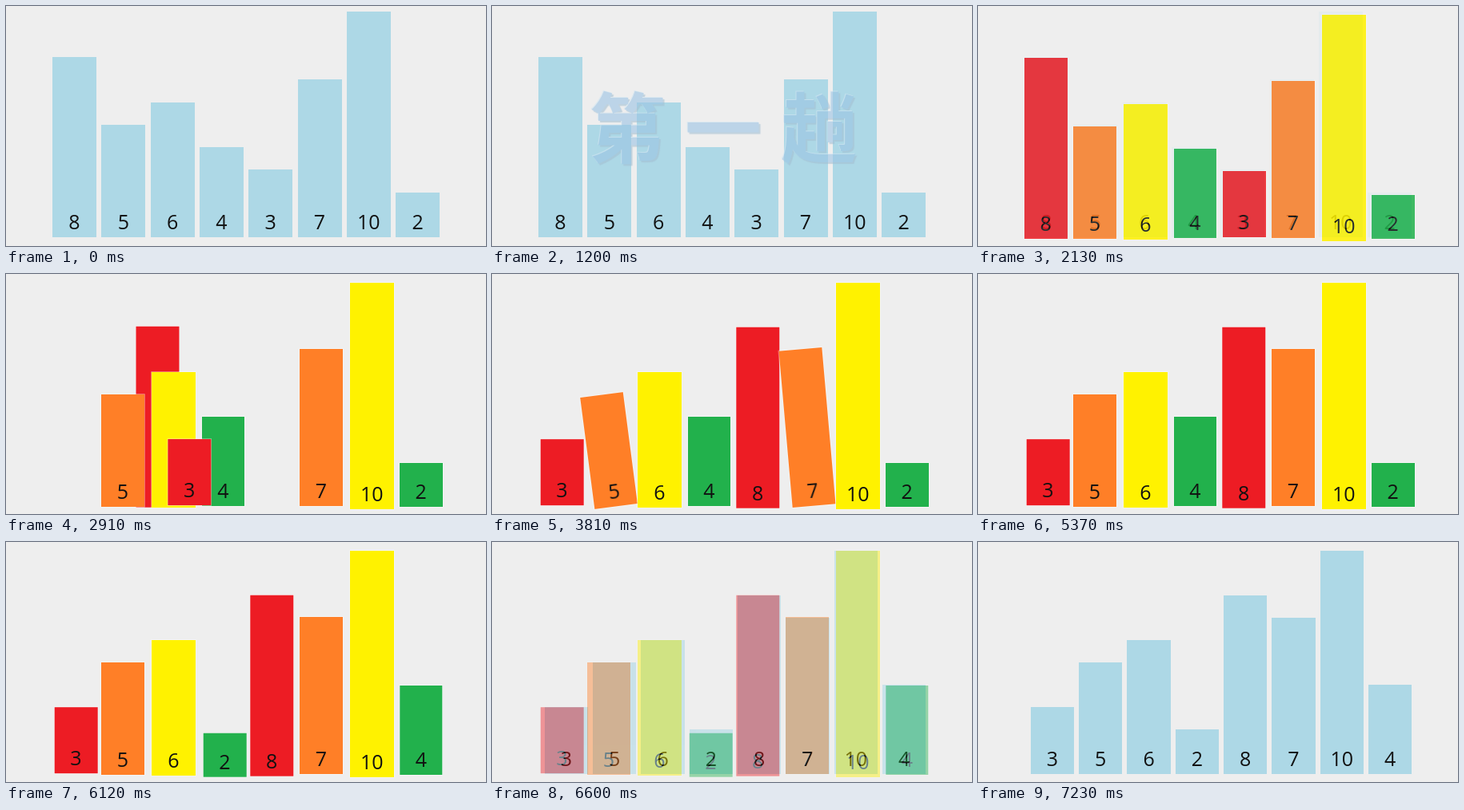
Animation of 600x301 px, one loop 7.29 s. Source, as an HTML page:

```html
<!DOCTYPE html>
<html lang="zh">
<head>
<meta charset="utf-8">
<title>Shell sort, first pass</title>
<style>
  html, body { margin: 0; width: 100%; height: 100%; overflow: hidden; background: #eee; }
  .stage { position: relative; width: 600px; height: 301px; overflow: hidden; --loop: 7290ms; }
  .slide { position: absolute; inset: 0; background: #eee; }
  .bar {
    position: absolute;
    color: #111;
    font: 25px/24px "Open Sans", "Noto Sans", sans-serif;
    text-align: center;
  }
  .bar span { position: absolute; left: 0; right: 0; bottom: 8px; }
  .blue { background: #add8e6; }
  .red { background: #ed1c24; }
  .orange { background: #ff7f27; }
  .yellow { background: #fff200; }
  .green { background: #22b14c; }
  #work .bar { box-shadow: 0 0 0 .7px rgba(255, 255, 255, .5); }

  .title {
    position: absolute;
    left: 121px;
    top: 98px;
    white-space: nowrap;
    font: 700 96px/100px "Noto Sans CJK SC", "Noto Sans CJK", sans-serif;
    letter-spacing: 24px;
    color: #9cc4e4;
    text-shadow: -1px -1px #d3e6f2, 2px 2px 1px #a3bfd2;
    animation: title var(--loop) linear infinite;
  }
  @keyframes title {
    0%, .8% { opacity: 0; }
    8.2%, 12.3% { opacity: 1; }
    16.46% { opacity: .6; }
    19.5%, 100% { opacity: 0; }
  }

  /* Slide dissolves */
  #work { animation: work var(--loop) linear infinite; }
  @keyframes work {
    0%, 18.5% { opacity: 0; }
    21.9% { opacity: .5; }
    29.2% { opacity: .86; }
    31.3%, 100% { opacity: 1; }
  }
  #after { animation: after var(--loop) linear infinite; }
  @keyframes after {
    0%, 85.1% { opacity: 0; }
    89.2% { opacity: .5; }
    96% { opacity: .86; }
    98.4%, 100% { opacity: 1; }
  }

  /* Swapped pairs */
  .red { animation: swap-red var(--loop) ease-in-out infinite; }
  .green { animation: swap-green var(--loop) ease-in-out infinite; }
  @keyframes swap-red {
    0%, 33.2% { transform: none; }
    48%, 100% { transform: translate(var(--dx), var(--dy)); }
  }
  @keyframes swap-green {
    0%, 73.8% { transform: none; }
    83.6%, 100% { transform: translate(var(--dx), var(--dy)); }
  }

  /* Pairs already in order rock in place */
  .orange { --at: 3610ms; }
  .yellow { --at: 4550ms; }
  .orange, .yellow {
    animation: rock var(--loop) ease-in-out calc(var(--at) - var(--loop)) infinite;
  }
  @keyframes rock {
    0%, 11.11%, 100% { transform: rotate(0deg); }
    .926%, 4.63%, 8.333% { transform: rotate(var(--tilt)); }
    2.778%, 6.481%, 10.185% { transform: rotate(calc(-1 * var(--tilt))); }
  }
</style>
</head>
<body>
<div class="stage">
  <div class="slide" id="before"><div class="title">第一趟</div></div>
  <div class="slide" id="work"></div>
  <div class="slide" id="after"></div>
</div>
<script>
  function addBar(slide, kind, value, x, y, w, h, vars = {}) {
    const bar = document.createElement("div");
    bar.className = "bar " + kind;
    Object.assign(bar.style, { left: x + "px", top: y + "px", width: w + "px", height: h + "px" });
    for (const name in vars) bar.style.setProperty("--" + name, vars[name]);
    const label = document.createElement("span");
    label.textContent = value;
    bar.append(label);
    slide.prepend(bar);
  }

  function addChart(id, values, left, pitch, width, base, unit) {
    const slide = document.getElementById(id);
    values.forEach((v, i) =>
      addBar(slide, "blue", v, left + i * pitch, base - v * unit, width, v * unit));
  }

  addChart("before", [8, 5, 6, 4, 3, 7, 10, 2], 58, 61.3, 55, 290.3, 28.3);
  addChart("after", [3, 5, 6, 2, 8, 7, 10, 4], 65.8, 60.3, 54.3, 291.3, 28);

  const move = (dx, dy) => ({ dx: dx + "px", dy: dy + "px" });
  const tilt = deg => ({ tilt: deg + "deg" });
  const bars = [
    ["red", 8, 57.5, 65, 54.5, 227, move(247.3, 1.7)],
    ["orange", 5, 119, 150.5, 54, 140.5, tilt(7.4)],
    ["yellow", 6, 182, 122.5, 55, 170, tilt(7.7)],
    ["green", 4, 245, 179, 53, 112, move(247.3, 1)],
    ["red", 3, 305.5, 206.5, 54.5, 83.5, move(-245.3, .2)],
    ["orange", 7, 367, 93.5, 54, 197, tilt(5)],
    ["yellow", 10, 430, 11, 54.5, 283.5, tilt(5.5)],
    ["green", 2, 492, 237, 53.5, 55, move(-245.3, 2.7)]
  ];
  // Bars are prepended, so go right to left to keep later bars on top.
  const work = document.getElementById("work");
  bars.reverse().forEach(bar => addBar(work, ...bar));
</script>
</body>
</html>
```
